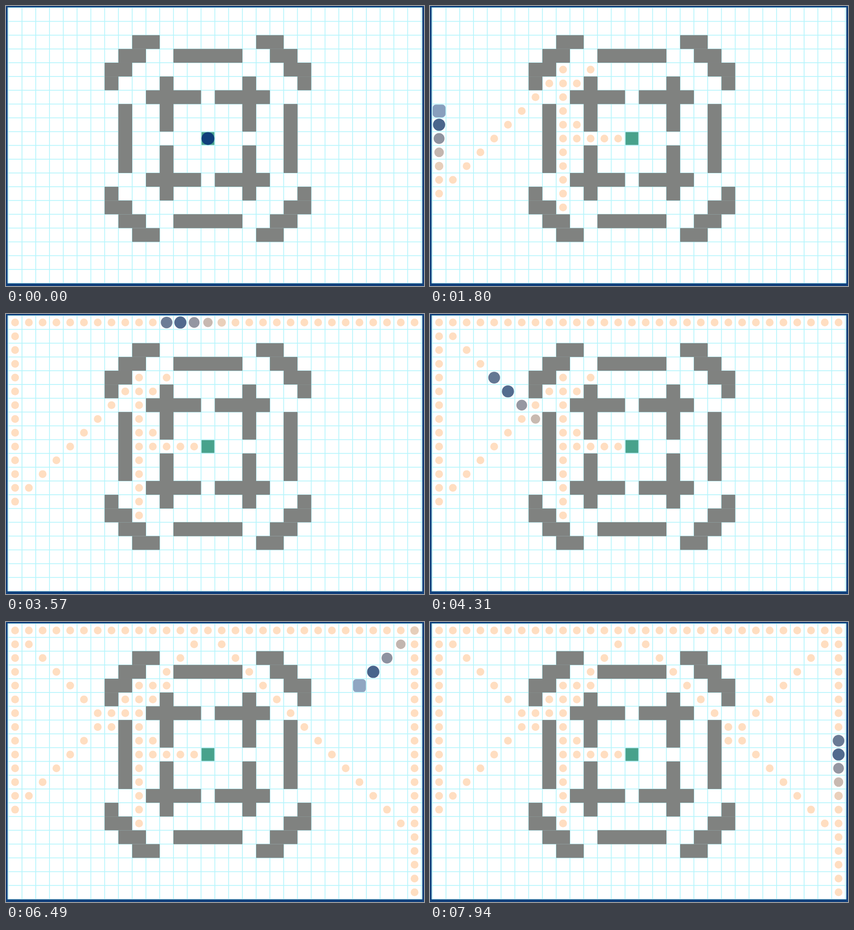
Recreate the animation shown at these times as an HTML page with a canvas. Size 914 by 612 pixels, loop 8 s.

```html
<!DOCTYPE html>
<html lang="en">
<head>
<meta charset="utf-8">
<title>Grid walk</title>
<style>
  html, body { margin: 0; width: 100%; height: 100%; overflow: hidden; background: #fff; }
  canvas { display: block; width: 914px; height: 612px; }
</style>
</head>
<body>
<canvas id="stage" width="914" height="612"></canvas>
<script>
const ctx = document.getElementById('stage').getContext('2d');
const W = 914, H = 612, COLS = 30, ROWS = 20;
const LOOP = 8000, START = 21, STEP = 32.13;
const LINE = '#b8f5fc', WALL = '#808280', GREEN = '#48a28c';
const NAVY = [16, 63, 123], PEACH = [255, 222, 193];
const BIG = 14, SMALL = 8.5;
const HOME = { x: 14, y: 9 };

const edgeX = c => 4.8 + 30.12 * c;
const edgeY = r => 3.5 + 30.12 * r;
const clamp = v => Math.max(0, Math.min(1, v));
const rgb = c => `rgb(${c.join(',')})`;

// One quadrant of walls: column, row, width, height; the rest is mirrored
const QUADRANT = [
  [9, 2, 2, 1], [8, 3, 2, 1], [7, 4, 2, 1], [7, 5, 1, 1],
  [11, 5, 1, 4], [10, 6, 4, 1], [12, 3, 5, 1], [8, 7, 1, 5]
];
const WALLS = QUADRANT.flatMap(([c, r, w, h]) =>
  [c, 29 - c - w].flatMap(x => [r, 19 - r - h].map(y => [x, y, w, h])));

// The walker keeps each heading until it is blocked, which costs a step.
// A number makes it turn early instead.
const HEADINGS = 'W W W NE SW S N SE NE SW N SW N13 E W SE NW SE NE SE E E S N SW NE S N';

const blocked = (x, y) => x < 0 || y < 0 || x >= COLS || y >= ROWS ||
  WALLS.some(([c, r, w, h]) => x >= c && x < c + w && y >= r && y < r + h);

function walk() {
  const seen = new Set();
  const visits = [];
  let { x, y } = HOME, step = 0;
  const visit = () => {
    const key = y * COLS + x;
    visits.push({ x, y, key, arrive: step, leave: step, again: seen.has(key) });
    seen.add(key);
  };
  visit();
  for (const heading of HEADINGS.split(' ')) {
    const dx = heading.includes('E') - heading.includes('W');
    const dy = heading.includes('S') - heading.includes('N');
    let left = parseInt(heading.replace(/\D/g, '')) || Infinity;
    while (left > 0 && !blocked(x + dx, y + dy)) {
      x += dx;
      y += dy;
      step++;
      left--;
      visit();
    }
    if (left > 0) visits[visits.length - 1].leave = ++step;
  }
  return visits;
}
const visits = walk();

function drawBoard() {
  ctx.fillStyle = '#fff';
  ctx.fillRect(0, 0, W, H);
  ctx.fillStyle = LINE;
  for (let c = 0; c <= COLS; c++) ctx.fillRect(edgeX(c) - 0.9, 0, 1.8, H);
  for (let r = 0; r <= ROWS; r++) ctx.fillRect(0, edgeY(r) - 0.9, W, 1.8);
  ctx.fillStyle = WALL;
  for (const [c, r, w, h] of WALLS)
    ctx.fillRect(edgeX(c), edgeY(r), edgeX(c + w) - edgeX(c), edgeY(r + h) - edgeY(r));
  ctx.fillStyle = rgb(NAVY);
  ctx.fillRect(0, 0, W, 3);
  ctx.fillRect(0, 0, 3.5, H);
  ctx.fillRect(910.3, 0, 4, H);
  ctx.fillRect(0, 606.3, W, 6);
}

function drawCell(cell, color, size, corner, alpha = 1) {
  ctx.globalAlpha = alpha;
  ctx.fillStyle = color;
  ctx.beginPath();
  ctx.roundRect(edgeX(cell.x + 0.5) - size, edgeY(cell.y + 0.5) - size,
    2 * size, 2 * size, Math.min(corner, size));
  ctx.fill();
  ctx.globalAlpha = 1;
}

// Ease-out from the walker's look (0) to a plain trail dot (1)
const settle = age => 1 - (1 - clamp((age - 0.7) / 5.4)) ** 2;

function drawVisit(v, step) {
  const rise = clamp((step - v.arrive) * 1.25);
  let fade = settle(step - v.leave);
  if (v.again) fade = Math.max(fade, 1 - rise);
  const color = rgb(NAVY.map((n, i) => n + (PEACH[i] - n) * fade));
  const size = BIG - (BIG - SMALL) * fade ** 1.5;
  if (v.again) drawCell(v, color, size, BIG);
  else drawCell(v, color, size, BIG * rise, rise);
}

function draw(t) {
  const step = (t - START) / STEP;
  drawBoard();
  drawCell(HOME, GREEN, BIG, 0);
  drawCell(HOME, rgb(NAVY), BIG, BIG, 1 - settle(step));
  const latest = new Map();
  for (const v of visits.slice(1)) if (v.arrive <= step) latest.set(v.key, v);
  for (const v of latest.values()) drawVisit(v, step);
}

const start = performance.now();
function tick() {
  draw((performance.now() - start) % LOOP);
  requestAnimationFrame(tick);
}
tick();
</script>
</body>
</html>
```
